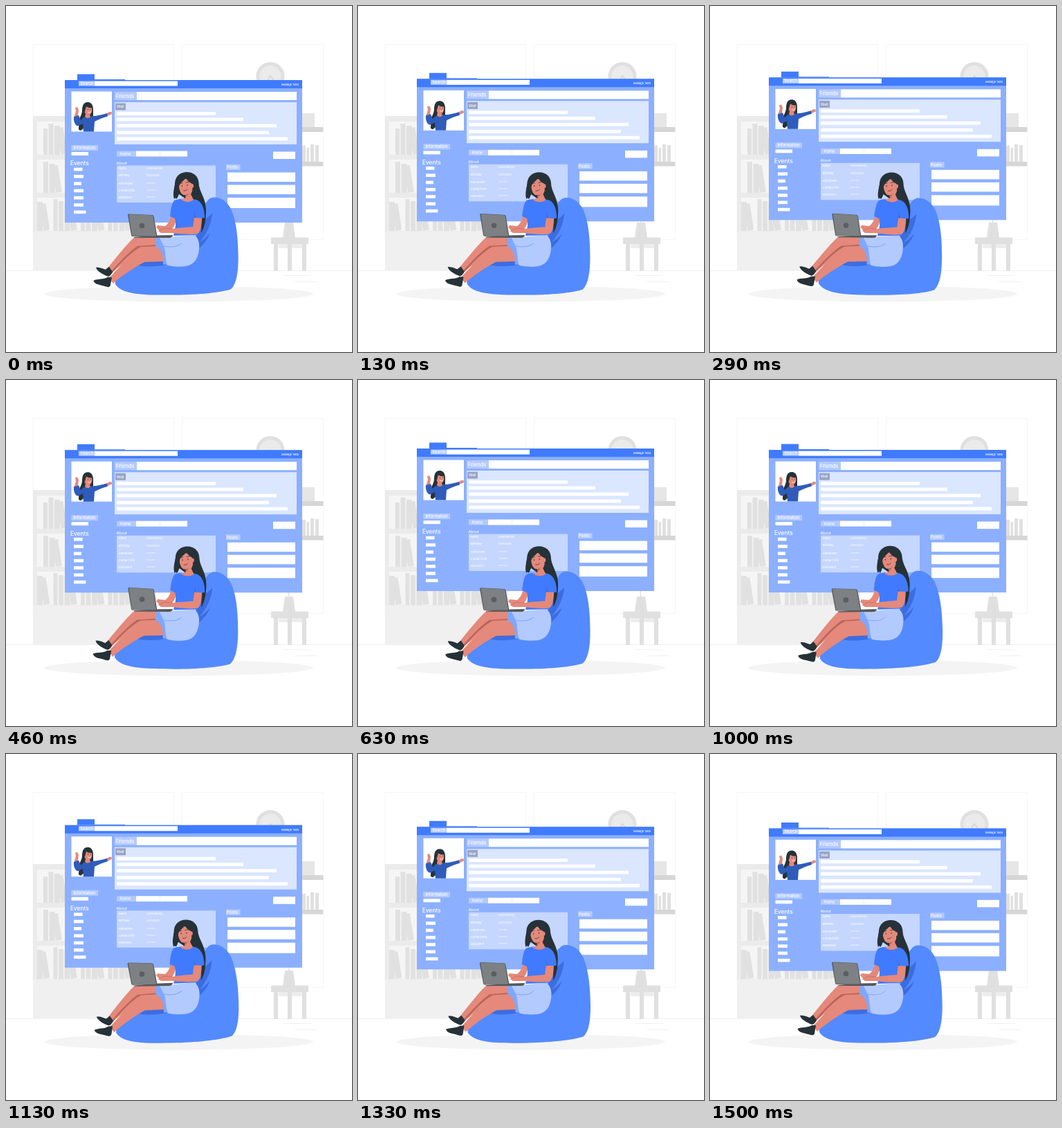
Recreate the animation shown at these times as an HTML page. Size 500 by 500 pixels, loop 1540 ms.

```html
<!DOCTYPE html>
<html lang="en">
<head>
<meta charset="utf-8">
<title>Social profile</title>
<style>
html, body { margin: 0; width: 100%; height: 100%; overflow: hidden; background: #fff; }
svg { display: block; width: 100vw; height: 100vh; }
text { font-family: Inter, Roboto, sans-serif; font-weight: 500; fill: #fff; }
.skin { fill: #e4897b; }
.dark { fill: #263238; }
.blue { fill: #407bff; }
.pale { fill: #b3caff; }
.line { fill: none; stroke-linecap: round; }
</style>
</head>
<body>
<svg viewBox="0 0 500 500">
  <g id="room">
    <path class="line" stroke="#f6f6f6" d="M39 338V55.5H242.500V338M254.500 338V55.500H458.500V337.500H254.500"/>
    <path class="line" stroke="#f0f0f0" d="M0 382.500H500M401 389.500H440M418 398.500H449"/>
    <path fill="#ebebeb" d="M39 159H217V382H39Z"/>
    <path fill="#f0f0f0" d="M39 326H217V382H39Z"/>
    <g id="books"></g>
    <circle cx="382" cy="101.500" r="20.500" fill="#e0e0e0"/>
    <circle cx="382" cy="101.500" r="15.500" fill="#ebebeb"/>
    <path class="line" stroke="#d4d4d4" stroke-width="1.500" d="M378 107L382 101L387 107"/>
    <path fill="#e6e6e6" d="M420 155H446V175H420Z"/>
    <path fill="#d6d6d6" d="M420 175H458.500V182H420ZM420 225H458.500V231.500H420Z"/>
    <path fill="#e0e0e0" d="M428 202H433V225H428ZM434.500 205H438V225H434.500ZM440 200H445V225H440ZM447 201H452V225H447Z"/>
    <path class="line" stroke="#e0e0e0" stroke-width="1.500" d="M409 314L408 304"/>
    <path fill="#e0e0e0" d="M403 313H415L418 335H400Z"/>
    <path fill="#ededed" d="M394 344H428V350H394Z"/>
    <path fill="#e0e0e0" d="M383 334.500H437V344H383ZM387 344H393V383H387ZM407 344H413V383H407ZM428 344H434V383H428Z"/>
    <ellipse cx="249.500" cy="416" rx="194" ry="11.500" fill="#f4f4f4"/>
  </g>

  <g id="panel">
    <path class="blue" d="M103 98.500H128V106H172V107H103Z"/>
    <path fill="#8cb0ff" d="M85 107H428V313H85Z"/>
    <path class="blue" d="M85 107H428V119H85Z"/>
    <path fill="#dbe6ff" d="M157 139H420V200H157Z"/>
    <path fill="#c5d6ff" d="M160 230.500H303V284H160Z"/>
    <path fill="#97a3c4" d="M158 140.500H173V150.500H158Z"/>
    <g id="labels" class="pale"></g>
    <g id="fields" fill="#fff"></g>
    <path stroke="#dbe6ff" stroke-width=".6" d="M222.500 209.500V217.500"/>
    <g id="words"></g>
    <g id="portrait">
      <path class="dark" d="M118 139C111 139 110 146 110 152C109 160 104 163 105 171C106 176 103 179 108 180L126 166V148C125 141 122 139 118 139Z"/>
      <path class="skin" d="M98.500 160L101 152L100 147L103 146L105 150L104 159ZM145 156L149 153L152.500 153L153 156L149 158L145 159Z"/>
      <path fill="#2f5cba" d="M112 161L108 165L105 158L98 160C97 167 101 175 105 173L111 170L112 181.500H127L128 167C134 164 140 161 147 159.500L146 155C139 157 131 159 125 159Z"/>
      <path class="skin" d="M113 146C115 142 122 142 124 146C125 151 124 155 121 157L122 160C119 163 116 162 114 160L115 156C113 153 112 149 113 146Z"/>
      <path class="dark" d="M111 151C111 142 115 140 119 141C123 141 125 144 125 147C121 148 117 146 116 145C115 149 114 153 112 156Z"/>
      <path class="line" stroke="#263238" stroke-width=".7" d="M118.500 149V149.600M122.500 149V149.600"/>
      <path class="line" stroke="#fff" stroke-width=".8" d="M118.500 153.500Q121 155 122.500 153"/>
    </g>
  </g>

  <g id="sitter">
    <path fill="#548aff" d="M158 402C168 417.500 200 418 245 417.500C280 417 310 414 325 409C334 402 336.500 380 335.500 355C335 330 332 308 325 293C319 282 310 276 300 276.500C290 277 286 290 283 300L270 345L200 368C180 373 165 385 158 392Z"/>
    <path fill="#3c6de0" d="M286 310C291 306 296 302 298 299C297 316 289 331 280 341C284 339 290 334 295 328C291 339 284 346 279 350L274 335ZM232 374C215 377 200 377 187 374L200 366L228 366Z"/>
    <path class="dark" d="M243 279C240 270 244 262 244 255C245 245 253 240 261 240C271 240 278 246 278.500 256C279 269 289 277 289 295C289 309 287 320 282 328C284 315 279 300 270 286L250 272Z"/>

    <path class="skin" d="M218 333.500L186 334C177 341 158 365 146 380L152 387C162 377 188 357 218 349Z"/>
    <path fill="#b9655b" d="M195 348C181 355 163 374 152 388L150 386C163 371 178 355 190 347L218 345V352Z"/>
    <path class="skin" d="M229 346.500L197 348C184 354 161 381 149 393L155 401C167 390 185 378 200 370L231 369Z"/>
    <path class="dark" d="M130 378C136 377 140 380 144 381L149 377L154 384C152 389 149 392 146 390.500C140 388 132 384 130 378Z"/>
    <path class="dark" d="M126.500 397C133 394 141 396 147 392L153 392L151 404C150 407 147 406.500 144 405.500C136 403 128 403 126.500 397Z"/>
    <path fill="#80a7ff" d="M216 335H240L250 374L227 373.500C229 361 224 351 216 347Z"/>
    <path class="pale" d="M222 335L272 331C279 335 281 346 278 358C275 370 268 376 255 376.500C245 377 238 376 233 374.500C230 365 231 355 228 347Z"/>
    <path class="line" stroke="#80a7ff" d="M228 347Q246 350 253 343"/>

    <path class="skin" d="M238 304L246 307C245 315 242 321 238 324L224 327L217 320L219 317L230 318C234 315 237 310 238 304Z"/>
    <path class="blue" d="M243 281C250 277.500 268 278 275 280C284 283 287 295 287 306L278 308C279 315 278 325 276 331L242 332C245 321 246 314 244 307L237 304C238 295 239 286 243 281Z"/>
    <path fill="#3260cc" d="M271 294C273 304 274 312 269 319L278 321L279 307L274 306Z"/>
    <path class="skin" d="M249 255C250 249 263 248 269 253C271 260 270 267 267 272L271 280C265 285 256 283 252 279L259 278V273C254 274 250 269 249 255Z"/>
    <path fill="#b9655b" d="M259 273Q264 272 266 268L259 278Z"/>
    <path class="dark" d="M246 279C241 270 243 262 245 254C247 245 254 242 261 242C269 242 276 248 276 258C276 266 274 272 272 277L269 263L268 256C264 255 261 251 260 248C257 253 251 255 250 261C249 267 251 275 246 279Z"/>
    <ellipse class="skin" cx="269" cy="260" rx="2" ry="3"/>
    <path class="line" stroke="#263238" stroke-width="1.200" d="M254.200 259.500V260.200M262 258.500V259.200"/>
    <path class="line" stroke="#263238" stroke-width=".7" d="M252 256.500L255 255.500M260 255L264 254.500M256.500 266.800Q260 268 262 265"/>
    <path class="skin" d="M272 306L283 306.500C283 317 281 327 277 329C268 331 250 329 240 328L224 328L220 325L228 321L241 322C252 320 263 320 270 319Z"/>
    <path class="line" stroke="#b9655b" stroke-width=".6" d="M221 325L229 321L240 322"/>

    <path fill="#55595d" d="M184 334L215 331.500L241 331C241 333 239 335 236 335H186Z"/>
    <path fill="#55595d" d="M176 302Q176 300.500 178 300.500L211 302Q213 302 213.500 304L218.500 333H183Q181 333 181 331Z"/>
    <path fill="#7d8184" d="M177.500 302Q177.500 301 179 301L210 302.500Q212 302.500 212.500 304L217 332.500H183.500Q182 332.500 182 331Z"/>
    <circle cx="196.500" cy="317.500" r="3.800" fill="#5a5e62"/>
  </g>
</svg>
<script>
const $ = id => document.getElementById(id);
const rect = (x, y, w, h, fill) =>
  `<rect x="${x}" y="${y}" width="${w}" height="${h}"${fill ? ` fill="${fill}"` : ''}/>`;
const rects = list => list.map(r => rect(...r)).join('');
const word = (x, y, size, text) => `<text x="${x}" y="${y}" font-size="${size}">${text}</text>`;

// Bookcase: three open shelves of upright and leaning books
$('books').innerHTML = [215, 270, 325].map((base, row) => {
  let out = rect(45, base - 48, 166, 48, '#f5f5f5');
  for (let x = row < 2 ? 54 : 45, i = row; x < 205; i++) {
    const w = 6 + i * 5 % 4, h = 38 + i * 7 % 10, lean = i % 4 === 3 ? -9 : 0;
    out += `<g transform="rotate(${lean} ${x} ${base})">${rect(x, base - h, w, h, '#e1e1e1')}</g>`;
    x += w + (lean ? 5 : 1.5);
  }
  return out;
}).join('');

$('labels').innerHTML = rects([
  [105, 108.5, 23, 7], [157, 124, 32, 12], [94.5, 201, 38.5, 8],
  [160, 209.5, 28, 8], [318, 229, 20.5, 8]
]);

const lines = [[153, 143], [161.5, 183], [170.5, 231], [180.5, 220], [189.5, 247]];
const eventWidths = [12.5, 14, 11, 14, 14, 14, 17.5];
$('fields').innerHTML = rects([
  [128, 108.5, 120, 7], [94.5, 123.5, 58.5, 58], [189, 124, 231, 12],
  [94.5, 211, 24.5, 5], [188, 209.5, 74, 8], [386, 210.5, 32, 10.5],
  [320, 240.5, 98, 13.5], [320, 258.5, 98, 13.5], [320, 277, 98, 15],
  ...lines.map(([y, w]) => [160, y, w, 4.8]),
  ...eventWidths.map((w, i) => [98, 233.7 + i * 10.3, w, 4.6])
]);

const details = [
  ['Name', 'Lena Morby', 236], ['Birthday', '00/00/00', 246.3], ['Hometown', '******', 258],
  ['Contact info', '******', 268], ['Education', '******', 278]
];
$('words').innerHTML = [
  [107, 114, 5.8, 'Search'], [398, 115, 3.9, 'Manage Tabs'], [158.7, 132.8, 7.5, 'Friends'],
  [160, 147.3, 5.2, 'Wall'], [97.5, 207, 5.8, 'Information'], [93, 230.3, 8.3, 'Events'],
  [164.5, 215.6, 5.6, 'Home'], [159.5, 229, 5.3, 'About'], [319, 235.3, 6.1, 'Posts'],
  ...details.flatMap(([key, value, y]) => [[162.5, y, 4.1, key], [203, y, 4.1, value]])
].map(w => word(...w)).join('');

const LOOP = 1540;
function draw(now) {
  const phase = (now + 35) / LOOP % 1;
  const lift = 9.7 * (1 - Math.abs(2 * phase - 1));
  const sway = 1 - 4 * Math.abs((phase + 0.25) % 1 - 0.5);
  $('panel').setAttribute('transform', `translate(0 ${0.45 - lift})`);
  $('sitter').setAttribute('transform', `rotate(${sway} 231 328)`);
}

let start;
function tick(now) {
  start ??= now;
  draw(now - start);
  requestAnimationFrame(tick);
}
draw(0);
requestAnimationFrame(tick);
</script>
</body>
</html>
```
